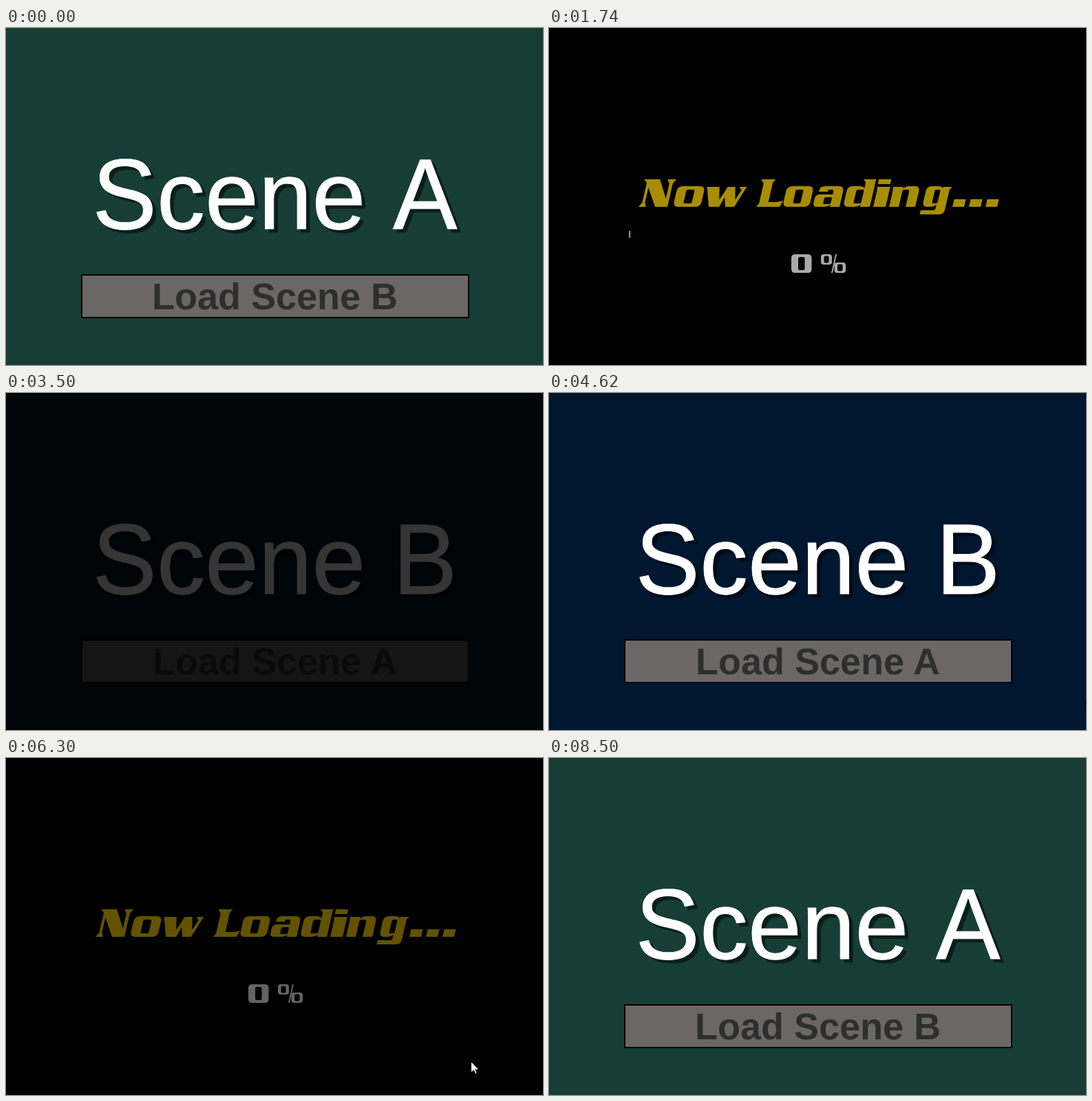
Write an HTML page that moves like this. It is 780 px wide and 490 px high and loops after 8780 ms.

```html
<!DOCTYPE html>
<html lang="en">
<head>
<meta charset="utf-8">
<title>Scene loading</title>
<style>
html, body { margin: 0; width: 100%; height: 100%; overflow: hidden; background: #000; }
svg { display: block; width: 780px; height: 490px; }
text { font-family: "Liberation Sans", Arial, sans-serif; text-rendering: geometricPrecision; }
.title { font-size: 140px; stroke-width: .9px; }
.label { font-size: 54px; font-weight: bold; text-anchor: middle; fill: #2e2e2e; }
</style>
</head>
<body>
<svg id="stage" viewBox="0 0 780 490"></svg>
<script>
const LOOP = 8780;
const stage = document.getElementById('stage');

// Rounded box as a path piece
const box = (x, y, w, h, r) =>
  `M${x + r} ${y}h${w - 2 * r}q${r} 0 ${r} ${r}v${h - 2 * r}q0 ${r} ${-r} ${r}` +
  `h${2 * r - w}q${-r} 0 ${-r} ${-r}v${2 * r - h}q0 ${-r} ${r} ${-r}z`;
const ring = (x, y, w, h, r, sx, sy) =>
  box(x, y, w, h, r) + box(x + sx, y + sy, w - 2 * sx, h - 2 * sy, 2);

// Wide italic lettering, drawn upright and slanted afterwards
const lettering = [
  'M130 260L134 254V225L129 220H152L167 248V226L163 220H176L172 226V260H154L138 232V254L141 260Z',
  ring(180, 230, 40, 30, 8, 14, 5),
  'M223 231H241L245 250L253 231H264L268 250L274 236L270 231H281L279 235L269 260H256L252 246L247 260H232Z',
  'M301 260L304 255V226L299 220H320L317 225V253H329L338 251L335 260Z',
  ring(339, 230, 39, 30, 8, 14, 5),
  'M387 238V236Q387 230 394 230H414Q422 230 422 238V260H408V257Q405 260 400 260H389Q383 260 383 254V248Q383 242 389 242H408V238Q408 235 405 235H400V238Z' +
    box(397, 246, 11, 10, 2),
  'M448 220H466V260H452V257Q449 260 444 260H434Q427 260 427 252V238Q427 230 434 230H444Q449 230 452 233V225Z' +
    box(441, 235, 11, 20, 2),
  'M470 220H488V227H470ZM470 231H489V260H471V235Z',
  'M493 231H508V234Q511 230 517 230H525Q532 230 532 238V260H518V238Q518 235 515 235H511Q508 235 508 238V260H494V236Z',
  'M549 230H559Q563 230 566 233V231H579L576 235V264Q576 271 569 271H541V265H559Q562 265 562 262V257Q559 260 555 260H549Q542 260 542 252V238Q542 230 549 230Z' +
    box(555, 235, 8, 20, 2),
  ...[586, 610, 634].map(x => `M${x} 249h17v11h-17z`)
].join('');

// Digits: wide stems, thin bars
const bars = {
  t: 'M2 0h25v5h-25z', m: 'M2 11h25v5h-25z', b: 'M2 22h25v5h-25z',
  p: 'M0 2h10v13h-10z', q: 'M19 2h10v13h-10z', r: 'M0 12h10v13h-10z', s: 'M19 12h10v13h-10z'
};
const digits = [
  ring(0, 0, 29.5, 27, 5.5, 10, 4),
  'M7 4.5L22.5 0V24L23.5 27H9L11 24V7L7 8.5Z',
  'tqmrb', 'tqmsb', 'pqms', 'tpmsb', 'tpmrsb',
  'M0 0H29V7L19 27H8L18 6H0Z',
  'tpqmrsb', 'tpqmsb'
].map(d => /^[a-z]+$/.test(d) ? [...d].map(k => bars[k]).join('') : d);

const title = ch =>
  `<text class="title" transform="translate(125.5 292) scale(1 1.04)">S</text>` +
  `<text class="title" x="218.9" y="292">cene</text>` +
  `<text class="title" transform="translate(562 292) scale(1 1.04)">${ch}</text>`;

const scene = (here, next, bg) => `
  <g id="scene${here}">
    <rect width="780" height="490" fill="${bg}"/>
    <g transform="translate(5.5 5)" stroke="#000" opacity=".5">${title(here)}</g>
    <g fill="#fff" stroke="#fff">${title(here)}</g>
    <rect id="button${here}" x="110" y="359" width="562" height="62" stroke="#000" stroke-width="2"/>
    <text class="label" x="390.5" y="409">Load Scene ${next}</text>
  </g>`;

stage.innerHTML = `
  <defs>${digits.map((d, i) => `<path id="d${i}" d="${d}"${i ? '' : ' fill-rule="evenodd"'}/>`).join('')}</defs>
  ${scene('A', 'B', '#173e36')}
  ${scene('B', 'A', '#001730')}
  <g id="loading">
    <rect width="780" height="490"/>
    <path d="${lettering}" fill="#ffd500" fill-rule="evenodd" transform="matrix(1 0 -.23 1 59.8 0)"/>
    <rect id="bar" x="116" y="295" height="10" fill="#ffe800"/>
    <g fill="#fff">
      ${[0, 1, 2].map(i => `<use id="digit${i}"/>`).join('')}
      <g id="percent">
        <path d="${ring(0, 0, 16, 15, 4, 4.5, 2.5)}${ring(19.5, 12, 16.5, 15, 4, 4.5, 2.5)}" fill-rule="evenodd"/>
        <path d="M21 0h2L17 27h-2z"/>
      </g>
    </g>
  </g>
  <rect id="shade" width="780" height="490"/>
  <path id="cursor" d="M.5 .5V16.5L4.3 13L6.8 18.3L9.2 17.3L6.9 12H12Z" fill="#fff" stroke="#000"/>`;

const el = id => document.getElementById(id);
const clamp = v => Math.max(0, Math.min(1, v));
const show = (node, on) => node.setAttribute('visibility', on ? 'visible' : 'hidden');

// Linear value from [time, value] keys
function track(keys, t) {
  let i = keys.length - 1;
  while (i > 0 && keys[i][0] > t) i--;
  const a = keys[i], b = keys[i + 1];
  return b ? a[1] + (b[1] - a[1]) * clamp((t - a[0]) / (b[0] - a[0])) : a[1];
}

const shade = [
  [1007, 0], [1447, 1], [1520, .83], [1740, .83], [1740, .34], [1887, 0],
  [2970, 0], [3410, 1], [3850, 0],
  [5587, 0], [6027, 1], [6130, 1], [6570, 0],
  [7560, 0], [8000, 1], [8440, 0]
];
// 0 = idle, 1 = hovered
const hover = [
  [225, 0], [325, 1], [950, 1], [1005, .7], [1100, 1], [1447, 1], [1447, 0],
  [4880, 0], [4980, 1], [5530, 1], [5585, .7], [5680, 1], [6027, 1], [6027, 0]
];
const easeOut = p => p * (2 - p);
const easeIn = p => p * p;
const linear = p => p;
// start, end, from x, y, to x, y, easing
const moves = [
  [30, 440, 780, 449, 630, 401, easeOut],
  [1170, 1510, 630, 401, 780, 437, easeIn],
  [4620, 5180, 780, 446, 630, 402, easeOut],
  [6120, 6300, 630, 402, 675, 441, easeIn],
  [6300, 6390, 675, 441, 701, 449, linear],
  [6390, 6660, 701, 449, 781, 452, linear]
];

function moveCursor(t) {
  const m = moves.filter(m => m[0] <= t).pop();
  show(el('cursor'), m);
  if (!m) return;
  const [start, end, x0, y0, x1, y1, ease] = m;
  const p = ease(clamp((t - start) / (end - start)));
  el('cursor').setAttribute('transform',
    `translate(${Math.round(x0 + (x1 - x0) * p)} ${Math.round(y0 + (y1 - y0) * p)})`);
}

function setProgress(p) {
  const text = String(Math.floor(p * 100));
  const last = 352 + 16.5 * (text.length - 1);
  el('bar').setAttribute('width', 550 * p);
  for (let i = 0; i < 3; i++) {
    const use = el('digit' + i), ch = text[text.length - 1 - i];
    use.setAttribute('href', ch === undefined ? '' : '#d' + ch);
    use.setAttribute('transform', `translate(${last - 33 * i} 329)`);
  }
  el('percent').setAttribute('transform', `translate(${last + 43} 329)`);
}

function draw(t) {
  const view = t < 1447 || t >= 8000 ? 'A' : t >= 3410 && t < 6027 ? 'B' : '';
  show(el('sceneA'), view === 'A');
  show(el('sceneB'), view === 'B');
  show(el('loading'), !view);
  if (view) {
    const h = track(hover, t);
    const mix = v => Math.round(v + (245 - v) * h);
    el('button' + view).setAttribute('fill', `rgb(${mix(107)},${mix(103)},${mix(102)})`);
  } else {
    setProgress(clamp(t < 3410 ? (t - 1740) / 240 : (t - 6420) / 270));
  }
  el('shade').setAttribute('opacity', track(shade, t));
  moveCursor(t);
}

const begin = performance.now();
function tick() {
  draw((performance.now() - begin) % LOOP);
  requestAnimationFrame(tick);
}
draw(0);
requestAnimationFrame(tick);
</script>
</body>
</html>
```
